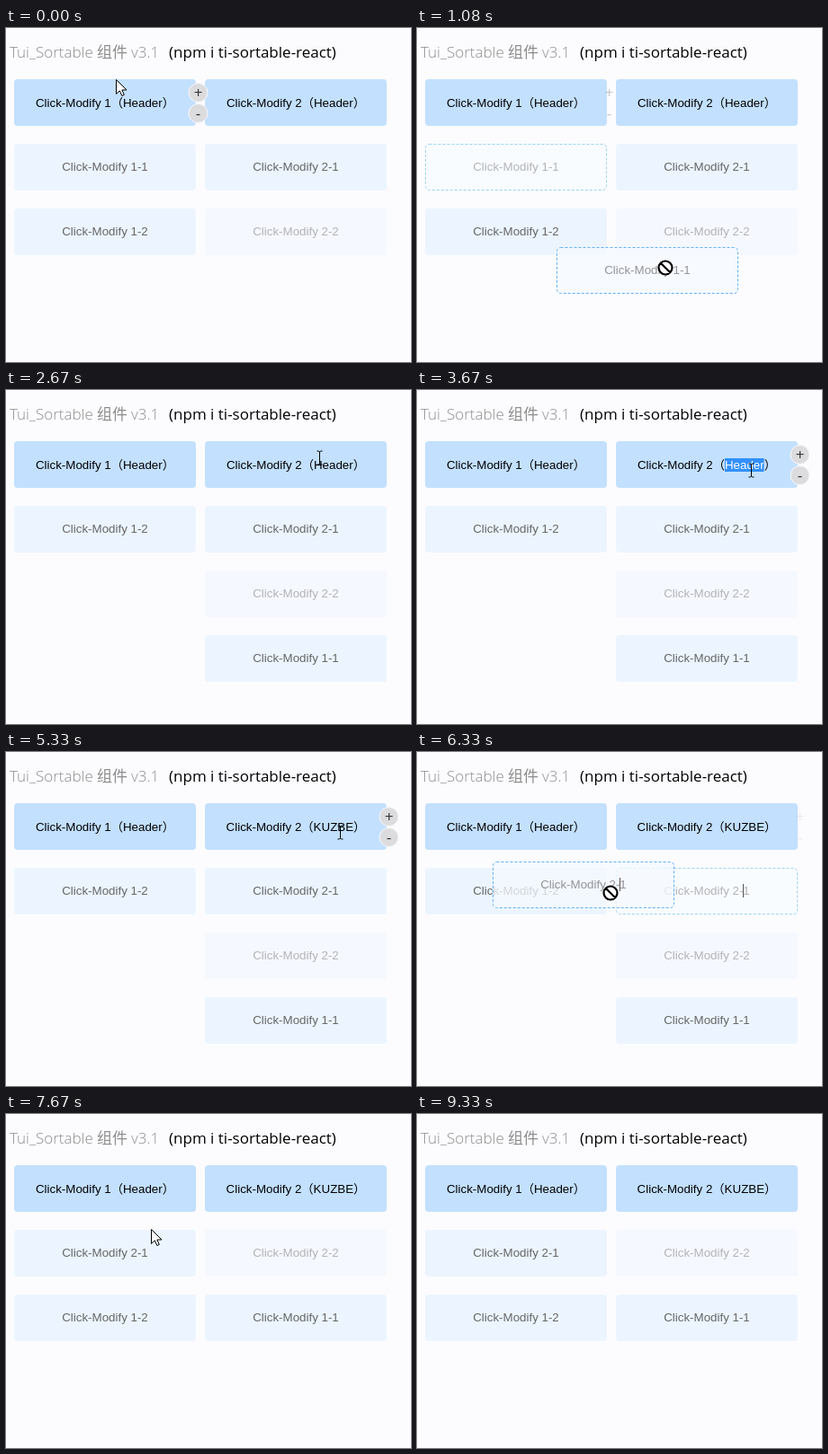
These frames come from a looping animation (450 by 372 pixels, 9.51 s). An HTML page with a canvas:

```html
<!DOCTYPE html>
<html>
<head>
<meta charset="utf-8">
<style>
  html, body { margin: 0; width: 100%; height: 100%; overflow: hidden; background: #fcfcff; }
  canvas { display: block; }
</style>
</head>
<body>
<canvas width="450" height="372"></canvas>
<script>
const ctx = document.querySelector('canvas').getContext('2d');
const LOOP = 9510, STEP = 1000 / 12;
const W = 202, H = 52, COLS = [9, 221], HEAD_Y = 57, ROW_GAP = 72;
const BG = '#fcfcff';
const SANS = '13.333px Arial, "Liberation Sans", "Noto Sans CJK SC", sans-serif';
const NEW_WORD = 'KUZBE', TYPE_START = 4245, TYPE_STEP = 167;
const GHOST_LAG = 32;

// The pointer rests between these straight moves.
const START = { x: 122, y: 57 };
const MOVES = [
  { from: 330, to: 580, x: 118, y: 143 },
  { from: 660, to: 1250, x: 338, y: 316 },
  { from: 1250, to: 1700, x: 333, y: 310 },
  { from: 2330, to: 2660, x: 348, y: 75 },
  { from: 2750, to: 3250, x: 371, y: 89 },
  { from: 5500, to: 5830, x: 367, y: 164 },
  { from: 6000, to: 6417, x: 177, y: 155 },
  { from: 6500, to: 6917, x: 161, y: 128 },
  { from: 8000, to: 8417, x: 425, y: 380 }
];
const DRAGS = [
  { name: '1-1', from: 660, to: 1990, col: 0 },
  { name: '2-1', from: 6000, to: 7320, col: 1 }
];

const within = (t, from, to) => t >= from && t < to;
const ramp = (t, from, to) => Math.min(1, Math.max(0, (t - from) / (to - from)));
const rowY = row => HEAD_Y + row * ROW_GAP;

function pointerAt(t) {
  return MOVES.reduce((p, m) => {
    const f = ramp(t, m.from, m.to);
    return { x: p.x + (m.x - p.x) * f, y: p.y + (m.y - p.y) * f };
  }, START);
}

function text(str, x, y, color, font = SANS, align = 'center') {
  ctx.font = font;
  ctx.textAlign = align;
  ctx.fillStyle = color;
  ctx.fillText(str, x, y);
}

function box(x, y, fill, dashColor) {
  ctx.beginPath();
  ctx.roundRect(x, y, W, H, 4);
  ctx.fillStyle = fill;
  ctx.fill();
  if (!dashColor) return;
  ctx.beginPath();
  ctx.roundRect(x + .5, y + .5, W - 1, H - 1, 4);
  ctx.setLineDash([3, 2]);
  ctx.lineWidth = 1;
  ctx.strokeStyle = dashColor;
  ctx.stroke();
  ctx.setLineDash([]);
}

function caret(x, y, color) {
  ctx.fillStyle = color;
  ctx.fillRect(Math.round(x), y, 1, 15);
}

function title() {
  const font = '17px "Open Sans", "Noto Sans", "Noto Sans CJK SC", sans-serif';
  const gray = '#8c8c8c';
  text('Tui_Sortable', 4, 33, gray, '300 ' + font, 'left');
  text('组件', 101, 33, gray, '300 ' + font, 'left');
  text('v3.1', 139, 33, gray, '300 ' + font, 'left');
  text('(npm i ti-sortable-react)', 181, 33, '#000', font, 'left');
}

function headers(t) {
  const typed = Math.floor((t - TYPE_START) / TYPE_STEP) + 1;
  const word = typed > 0 ? NEW_WORD.slice(0, typed) : 'Header';
  ['Header', word].forEach((name, i) => {
    const label = `Click-Modify ${i + 1}（${name}）`, mid = COLS[i] + W / 2;
    box(COLS[i], HEAD_Y, '#c3e0ff');
    text(label, mid, HEAD_Y + 31, '#000');
    if (i === 0) return;
    const wordEnd = mid + ctx.measureText(label).width / 2 - 13.3;
    if (within(t, 3410, TYPE_START)) {
      const width = ctx.measureText(name).width;
      ctx.save();
      ctx.beginPath();
      ctx.rect(wordEnd - width, 76, width, 15);
      ctx.clip();
      ctx.fillStyle = '#3390ff';
      ctx.fill();
      text(label, mid, HEAD_Y + 31, '#fff');
      ctx.restore();
    }
    if (within(t, TYPE_START, 5325)) caret(wordEnd, 76, '#222');
  });
}

function buttons(col, alpha) {
  ['+', '-'].forEach((sign, row) => {
    const x = COLS[col] + W + 2.5, y = 72 + row * 23;
    ctx.globalAlpha = Math.max(0, 2 * alpha - 1);
    ctx.beginPath();
    ctx.arc(x, y, 10.5, 0, 7);
    ctx.fillStyle = '#dcdcdf';
    ctx.fill();
    ctx.lineWidth = 1;
    ctx.strokeStyle = '#f8f8fa';
    ctx.stroke();
    ctx.globalAlpha = alpha;
    text(sign, x, y + 6, '#333', '17px "Open Sans", sans-serif');
    ctx.globalAlpha = 1;
  });
}

function cells(t, drag) {
  const layout = t < DRAGS[0].to ? [['1-1', '1-2'], ['2-1', '2-2']]
    : t < DRAGS[1].to ? [['1-2'], ['2-1', '2-2', '1-1']]
    : [['2-1', '1-2'], ['2-2', '1-1']];
  layout.forEach((names, col) => names.forEach((name, i) => {
    const x = COLS[col], y = rowY(i + 1);
    const held = drag?.name === name, disabled = name === '2-2';
    box(x, y, held ? '#f9fcff' : disabled ? '#f6f8ff' : '#ecf5ff', held && '#9ad2f8');
    text('Click-Modify ' + name, x + W / 2, y + 30, held || disabled ? '#b3b3b6' : '#666');
    if (name === '2-1' && within(t, 5825, DRAGS[1].to)) caret(x + 141, y + 18, '#555');
  }));
}

function ghost(t, { name, from, col }) {
  const now = pointerAt(Math.max(from, t - GHOST_LAG)), grab = pointerAt(from);
  const x = Math.round(COLS[col] + now.x - grab.x);
  const y = Math.round(rowY(1) + now.y - grab.y);
  box(x, y, 'rgba(246,250,255,.75)', '#62b0f6');
  text('Click-Modify ' + name, x + W / 2, y + 30, '#949498');
  if (name === '2-1') caret(x + 141, y + 18, '#555');
}

const arrow = new Path2D('M.5 .5V16.5L4.3 12.9L6.8 18.5L9.3 17.4L6.9 12H12Z');
const beam = new Path2D('M-3 -7.5H-1L0 -6.5L1 -7.5H3M0 -6.5V6.5M-3 7.5H-1L0 6.5L1 7.5H3');
const forbidden = new Path2D('M7.5 0A7.5 7.5 0 1 1 -7.5 0A7.5 7.5 0 1 1 7.5 0M-5.3 -5.3L5.3 5.3');

function pointer({ x, y }, dragging) {
  const overText = COLS.some(c => within(x - c, 14, 189)) &&
    [0, 1, 2, 3].some(row => within(y - rowY(row), 16, 36));
  const shape = dragging ? forbidden : overText ? beam : arrow;
  ctx.save();
  ctx.translate(Math.round(x), Math.round(y));
  if (shape === beam) ctx.translate(.5, .5);
  else {
    ctx.fillStyle = '#fff';
    ctx.fill(shape);
  }
  ctx.strokeStyle = '#000';
  ctx.lineWidth = dragging ? 2.2 : 1;
  ctx.stroke(shape);
  ctx.restore();
}

function draw(t) {
  const drag = DRAGS.find(d => within(t, d.from, d.to));
  ctx.fillStyle = BG;
  ctx.fillRect(0, 0, 450, 372);
  title();
  headers(t);
  buttons(0, 1 - ramp(t, 420, 1330));
  buttons(1, ramp(t, 2750, 3500) - ramp(t, 5500, 6420));
  cells(t, drag);
  if (within(t, 1240, DRAGS[0].to)) {
    box(COLS[1], rowY(3) + 1, '#f6f4f5', '#d8d3ce');
    text('可放置此处', 322, 303, '#d2d0d0', '12px "Noto Sans CJK SC", sans-serif');
  }
  if (drag) ghost(t, drag);
  pointer(pointerAt(t), drag);
}

function frame(now) {
  // the picture advances twelve times a second
  draw(Math.floor((now % LOOP + 4) / STEP) * STEP);
  requestAnimationFrame(frame);
}
requestAnimationFrame(frame);
</script>
</body>
</html>
```
